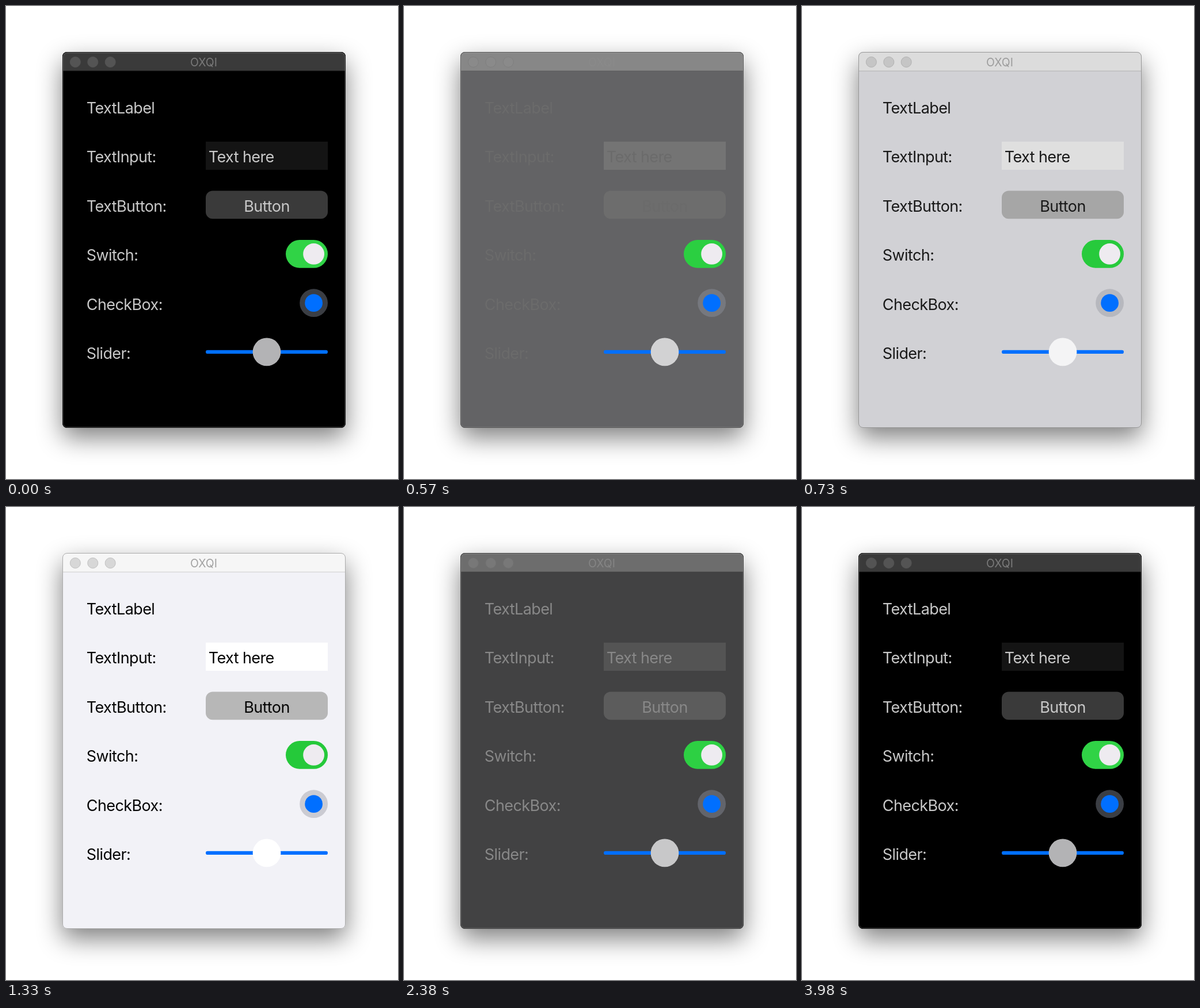
Recreate the animation shown at these times as an HTML page. Size 681x823 px, loop 4.03 s.

```html
<!DOCTYPE html>
<html lang="en">
<head>
<meta charset="utf-8">
<title>Theme fade</title>
<style>
  html, body { margin: 0; width: 100%; height: 100%; overflow: hidden; background: #fff; }
  svg { display: block; width: 681px; height: 823px; }
  text { font: 27px Inter, "Open Sans", sans-serif; letter-spacing: -0.022em; }
  .title { font-size: 19.5px; letter-spacing: 0; }
  .mid { text-anchor: middle; }
</style>
</head>
<body>
<svg id="stage" viewBox="0 0 681 823" xmlns="http://www.w3.org/2000/svg">
  <defs>
    <filter id="blur" filterUnits="userSpaceOnUse" x="0" y="0" width="681" height="823">
      <feGaussianBlur stdDeviation="22"/>
    </filter>
    <clipPath id="frame"><rect x="98" y="80" width="492" height="654" rx="8"/></clipPath>
  </defs>
  <rect x="98" y="97" width="492" height="654" rx="8" opacity=".5" filter="url(#blur)"/>
</svg>
<script>
const LOOP = 4030;
const stage = document.getElementById('stage');
const painted = [];

// Colours are RGB triples, or a single grey level.
const rgb = c => Array.isArray(c) ? c : [c, c, c];
const mix = (a, b, p) => a + (b - a) * p;
const css = channels => `rgb(${channels.map(Math.round).join()})`;
const fade = (dark, light) => p => css(rgb(dark).map((v, i) => mix(v, rgb(light)[i], p)));

function add(tag, attrs, parent = stage) {
  const el = document.createElementNS('http://www.w3.org/2000/svg', tag);
  for (const [name, value] of Object.entries(attrs)) {
    if (typeof value === 'function') painted.push({ el, name, value });
    else el.setAttribute(name, value);
  }
  return parent.appendChild(el);
}
const rect = (x, y, width, height, rx, fill, parent) =>
  add('rect', { x, y, width, height, rx, fill }, parent);
const circle = (cx, cy, r, fill, parent) => add('circle', { cx, cy, r, fill }, parent);
const label = (x, y, words, fill, kind = '') => {
  add('text', { x, y, fill, class: kind }).textContent = words;
};

const blue = '#006fff';
const ink = p => css(rgb(200 - 250 * p + 55 * p * p));
const rowY = i => 187 + 85.4 * i;

// Window
const pane = add('g', { 'clip-path': 'url(#frame)' });
rect(98, 80, 492, 654, 0, fade(0, [242, 242, 247]), pane);
rect(98, 80, 492, 33, 0, fade(58, 246), pane);
rect(98, 112.6, 492, 1, 0, fade(12, 204), pane);
add('rect', { x: 99.5, y: 81.5, width: 489, height: 651, rx: 6.5, fill: 'none',
  stroke: '#fff', 'stroke-opacity': p => 0.2 * (1 - p) }, pane);
add('rect', { x: 98.5, y: 80.5, width: 491, height: 653, rx: 7.5, fill: 'none',
  stroke: fade(22, 172) });
for (const x of [120.4, 150.8, 181.2])
  add('circle', { cx: x, cy: 97.5, r: 9, fill: fade(84, 215), stroke: fade(84, 192) });
label(343.5, 105, 'OXQI', fade(122, 162), 'title mid');

// Labels
['TextLabel', 'TextInput:', 'TextButton:', 'Switch:', 'CheckBox:', 'Slider:']
  .forEach((words, i) => label(139.8, rowY(i), words, ink));

// Controls
rect(347, 236, 212, 49, 0, fade(20, 255));
label(351.8, rowY(1), 'Text here', ink);

rect(347, 321.5, 212, 48.8, 12, fade(58, 183));
label(453, rowY(2), 'Button', ink, 'mid');

rect(486, 407, 73, 48.8, 24.4, fade([48, 211, 70], [37, 201, 58]));
circle(534.6, 431.4, 18.4, '#eeebf0');

circle(534.6, 516.7, 24.4, fade([59, 62, 68], [203, 203, 210]));
circle(534.6, 516.7, 15.4, blue);

rect(347, 598.8, 212, 6.2, 3.1, blue);
circle(453, 601.9, 24.4, fade([179, 179, 181], 255));

const easeOut = (t, start, length) => {
  const u = Math.min(1, Math.max(0, (t - start) / length));
  return 1 - (1 - u) ** 3;
};

// The picture advances in 50 ms steps, with one uneven step before 630 ms.
function stepTime(t) {
  if (t < 30) return 0;
  if (t >= 570 && t < 630) return 570;
  return 30 + 50 * Math.floor((t - 30) / 50);
}

function draw(time) {
  const t = stepTime(time % LOOP);
  const lightness = easeOut(t, 490, 497) - easeOut(t, 2218, 460);
  for (const { el, name, value } of painted) el.setAttribute(name, value(lightness));
}

let begin;
function tick(now) {
  begin ??= now;
  draw(now - begin);
  requestAnimationFrame(tick);
}
draw(0);
requestAnimationFrame(tick);
</script>
</body>
</html>
```
